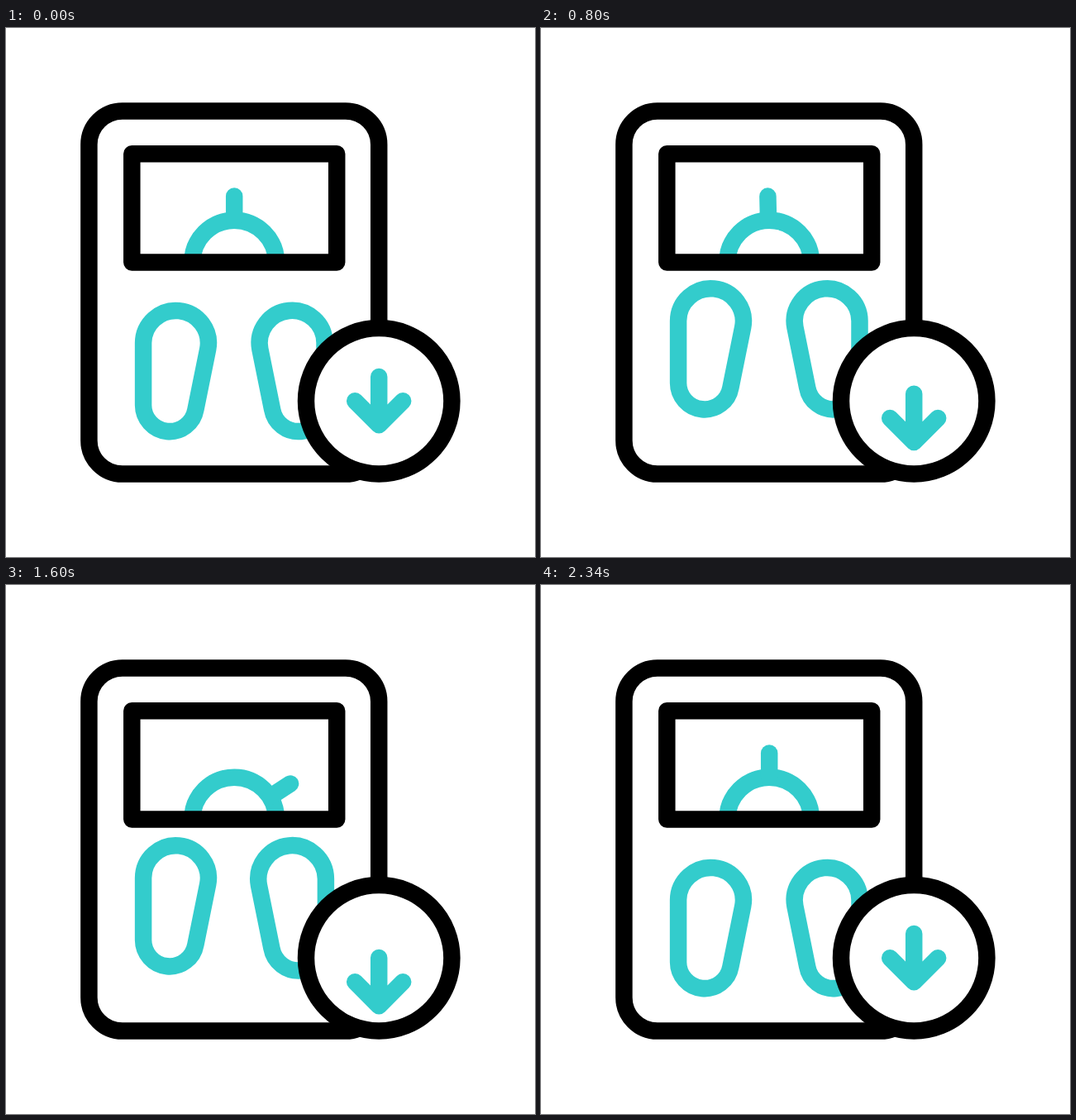
Write an HTML page that moves like this. It is 640x640 px and loops after 2400 ms.

```html
<!DOCTYPE html>
<html lang="en">
<head>
<meta charset="utf-8">
<title>Bathroom scale</title>
<style>
  html, body { margin: 0; width: 100%; height: 100%; overflow: hidden; background: #fff; }
  svg { display: block; width: 100vw; height: 100vh; }
  g { fill: none; stroke-width: 20.5; stroke-linecap: round; stroke-linejoin: round; }
  .ink { stroke: #000; }
  .teal { stroke: #33cccc; }
</style>
</head>
<body>
<svg viewBox="0 0 640 640">
  <g class="ink"><rect x="100.4" y="100.4" width="350.8" height="439.2" rx="40.5"/></g>
  <g class="teal">
    <path d="M225.4 283.5a50.8 50.8 0 0 1 101.6 0" stroke-linecap="butt"/>
    <path id="needle" d="M276.2 203.6V232"/>
    <path id="left" d="M166.1 381A39.4 39.4 0 1 1 244.2 388.7L229.4 461.8A31.9 31.9 0 0 1 166.1 455.6Z"/>
    <path id="right" d="M385.5 381A39.4 39.4 0 1 0 307.4 388.7L322.2 461.8A31.9 31.9 0 0 0 385.5 455.6Z"/>
  </g>
  <g class="ink">
    <rect x="152.3" y="152.3" width="247.9" height="131.2"/>
    <circle cx="451.2" cy="451.2" r="88.2" fill="#fff"/>
  </g>
  <g class="teal"><path id="arrow" d="M451.2 422V480.3M422.2 451.2L451.2 480.3L480.2 451.2"/></g>
</svg>
<script>
const LOOP = 2400;
const STROKE = 20.5;
const LIFT = { y: -16, s: 1.152 };   // foot in mid-step
const UPPER = -26.7;                 // foot after stepping up
const FOOT_Y = 414.5;

const [needle, left, right, arrow] =
  ['needle', 'left', 'right', 'arrow'].map(id => document.getElementById(id));

// [time, value] pairs joined by sine ease-in-out
const needleKeys = [[0, 0], [480, -12], [690, -12], [1120, 57], [1805, 57], [2238, 0]];
const arrowKeys = [[0, 0], [470, -29], [850, 22.8], [1190, -25], [1610, 29], [2136, 0]];

// start, mid and end of each step up and back down
const feet = [
  { el: left, x: 205.5, up: [200, 450, 700], down: [1770, 2025, 2340] },
  { el: right, x: 346.1, up: [0, 258, 500], down: [1565, 1805, 2115] },
];

function track(keys, t) {
  const i = keys.findIndex(k => k[0] > t);
  if (i < 0) return keys[keys.length - 1][1];
  const [t0, a] = keys[i - 1], [t1, b] = keys[i];
  return a + (b - a) * (1 - Math.cos(Math.PI * (t - t0) / (t1 - t0))) / 2;
}

// 0 outside the step, 1 at its middle
function lift([start, mid, end], t) {
  if (t <= start || t >= end) return 0;
  const u = t < mid ? (t - start) / (mid - start) : (end - t) / (end - mid);
  return Math.sin(u * Math.PI / 2);
}

function placeFoot({ el, x, up, down }, t) {
  const w = lift(up, t) + lift(down, t);
  const base = t < up[1] || t >= down[1] ? 0 : UPPER;
  const y = base + (LIFT.y - base) * w;
  const s = 1 + (LIFT.s - 1) * w;
  el.setAttribute('transform',
    `translate(${x} ${FOOT_Y + y}) scale(${s}) translate(${-x} ${-FOOT_Y})`);
  el.setAttribute('stroke-width', STROKE / s);
}

function draw(t) {
  needle.setAttribute('transform', `rotate(${track(needleKeys, t)} 276.2 284.5)`);
  arrow.setAttribute('transform', `translate(0 ${track(arrowKeys, t)})`);
  feet.forEach(f => placeFoot(f, t));
}

const begin = performance.now();
function tick() {
  draw((performance.now() - begin) % LOOP);
  requestAnimationFrame(tick);
}
tick();
</script>
</body>
</html>
```
